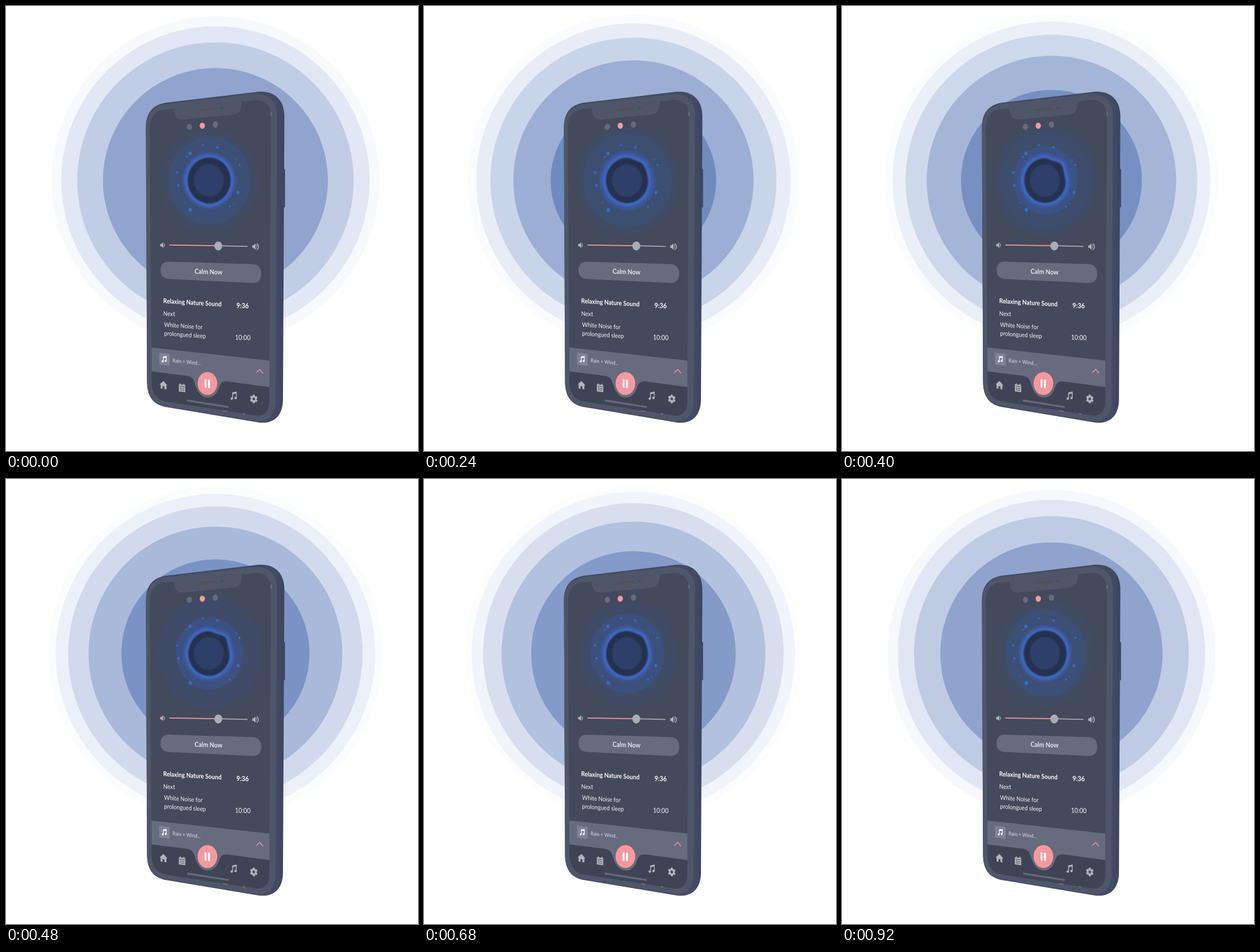
Animation of 720x778 px, one loop 0.96 s. Source, as an HTML page:

```html
<!DOCTYPE html>
<html lang="en">
<head>
<meta charset="utf-8">
<title>Calm player</title>
<style>
html, body { margin: 0; width: 100%; height: 100%; overflow: hidden; background: #fff; }
svg { display: block; width: 100vw; height: 100vh; }
text { font-family: Lato, "Open Sans", sans-serif; fill: #f4f5f7; }
.b { font-weight: 700; }
.icon { fill: #b0b4bc; }
.line { fill: none; stroke: #b0b4bc; stroke-linecap: round; }
</style>
</head>
<body>
<svg viewBox="0 0 720 778" xmlns="http://www.w3.org/2000/svg">
  <defs>
    <filter id="soft" x="-30%" y="-30%" width="160%" height="160%"><feGaussianBlur stdDeviation="2.6"/></filter>
    <filter id="fine" x="-30%" y="-30%" width="160%" height="160%"><feGaussianBlur stdDeviation="0.9"/></filter>
    <linearGradient id="side" x1="0" x2="1">
      <stop offset="0.94" stop-color="#434b64"/><stop offset="1" stop-color="#3b4561"/>
    </linearGradient>
    <g id="note">
      <path d="M-2.6 3.6V-5.2L4-6.6V2.4" fill="none" stroke="currentColor" stroke-width="1.5"/>
      <path d="M-2.6-4L4-5.4" stroke="currentColor" stroke-width="2"/>
      <ellipse cx="-4" cy="4.2" rx="2.1" ry="2" fill="currentColor"/>
      <ellipse cx="2.6" cy="3" rx="2.1" ry="2" fill="currentColor"/>
    </g>
    <clipPath id="screenClip">
      <path d="M251 213C252 194 260 183 276 181L434 164.500C453 163 463 174 463 194L460 692C460 709 451 718 435 715.500L283 692C264 689 255 679 254.500 658Z"/>
    </clipPath>
  </defs>

  <g id="waves"></g>

  <path d="M485.500 285H486.600Q487.600 285 487.600 287V350Q487.600 352 486.600 352H485.500Z" fill="#3a425b"/>
  <path d="M244.500 212C244.500 185 258 171 284 168.500L438 150.300C468 147 486 163 486.500 192L484 688C484 716 468 732 441 728L282 701.500C258 698 247 684 246.500 658Z" fill="url(#side)"/>
  <path d="M244.500 213C245 188 258 173.500 284 171L432 154C458 152 473 166 473.500 191L471 690C471 716 458 728 436 725.500L282 700C258 697 247 683 246.500 658Z" fill="#4f566a"/>

  <g clip-path="url(#screenClip)">
    <rect x="245" y="155" width="225" height="570" fill="#434a5b"/>
    <g id="pulse"></g>
    <g id="specks" fill="#3a69c1"></g>
    <path id="halo" fill="none" stroke="#3c62b8" stroke-width="9" filter="url(#soft)"/>
    <path id="rim" fill="#28334e" stroke="#4069c4" stroke-width="3.400" filter="url(#fine)"/>
    <ellipse cx="354.500" cy="305" rx="26" ry="28.500" fill="#2d416b" filter="url(#fine)"/>

    <path d="M253 597L461 620V668L384 690L330 690L253 640Z" fill="#666c7e"/>
    <path d="M253 638.500L316 646.500C326 648 328 653 331 663C335 677 343 684 352 684.500C361 685 368 679 372 668C375 659 378 655.500 388 656.500L462 666.500V722H253Z" fill="#3f4455"/>
    <path d="M285 163L293 180C294 193 299 199.500 309 198.500L397 190C407 189 412 182 412 167L412 160Z" fill="#4f566a"/>
  </g>
  <path d="M339.500 181.700L364.500 179.400" stroke="#53524f" stroke-width="3.600" stroke-linecap="round"/>
  <circle cx="377.300" cy="178" r="1.200" fill="#3d4054"/>
  <path d="M463 185V192M379 707.500L387 708.700M414 712.500L418 713.200" stroke="#8f95a5" stroke-width="0.900"/>

  <g fill="#656b7c">
    <ellipse cx="320.500" cy="211.300" rx="4.600" ry="5.400"/>
    <ellipse cx="343" cy="209.300" rx="4.600" ry="5.400" fill="#f69aa1"/>
    <ellipse cx="366" cy="207.300" rx="4.700" ry="5.500"/>
  </g>

  <path class="icon" d="M269.500 416H271.500L274.800 413.200V423L271.500 420.200H269.500Z"/>
  <path class="line" d="M276.500 416Q278 418.200 276.500 420.500" stroke-width="1.200"/>
  <path d="M285.500 417.800L371 419.200" stroke="#f2979f" stroke-width="1.700"/>
  <path d="M371 419.200L422 420.300" stroke="#a5aab3" stroke-width="1.700"/>
  <ellipse cx="371" cy="419.600" rx="6.900" ry="7.800" fill="#a9adb5"/>
  <path class="icon" d="M430.500 418.200H432.700L436 415.200V426L432.700 423H430.500Z"/>
  <path class="line" d="M437.800 418.200Q439.300 420.600 437.800 423M438.200 415.700C442.300 417.500 442.300 424 438.200 425.600" stroke-width="1.300"/>

  <path d="M284.500 446.900L431.500 451.200C441 451.700 446 458 446 468C446 478.500 440.500 484.800 431 484.200L284.500 477.200C275 476.700 270 471 270 461.800C270 452.500 275.500 446.600 284.500 446.900Z" fill="#666c7e"/>
  <g id="labels"></g>

  <path d="M267.700 606.300L286 608.500V629L267.700 626.700Z" fill="#7c8597"/>
  <use href="#note" transform="matrix(.78 .06 0 .85 277 618)" color="#fff"/>
  <path d="M437.500 641L443.300 635.200L449.300 642.300" fill="none" stroke="#f2979f" stroke-width="1.400"/>

  <ellipse cx="352" cy="660" rx="17.200" ry="20" fill="#f6989f"/>
  <path d="M347 652.500L350.400 652.900V667.500L347 667.100ZM353 653.200L356.400 653.600V668.200L353 667.800Z" fill="#fff"/>
  <path d="M317.500 689.800L388 701" stroke="#646a7b" stroke-width="3.200" stroke-linecap="round"/>

  <path class="icon" d="M275 655.500L282 663.200L280.300 663.300V670.200L276.800 669.700V665L273.500 664.600V669.200L270.200 668.700V662L268.500 661.500Z"/>
  <path class="icon" d="M302 661.300L304 661.500V659.800H305.500V661.700L310 662.200V660.500H311.500V662.400L313.300 662.600V675.200L302 673.700Z"/>
  <path d="M303 664.600L312.400 665.800" stroke="#3f4455" stroke-width="0.900"/>
  <path d="M304 668L311.500 669M304 671L311.500 672" stroke="#3f4455" stroke-width="1.300" stroke-dasharray="1.600 1.200"/>
  <use href="#note" transform="matrix(.98 .03 0 1.080 398.500 682)" color="#b0b4bc"/>
  <g transform="matrix(.92 .06 0 1.050 433 687)">
    <circle r="4" fill="none" stroke="#b0b4bc" stroke-width="3.400"/>
    <path id="teeth" stroke="#b0b4bc" stroke-width="3.600"/>
  </g>
</svg>
<script>
const NS = "http://www.w3.org/2000/svg";
const LOOP = 960, STEP = 40;
const $ = id => document.getElementById(id);

function add(parent, tag, attrs) {
  const el = document.createElementNS(NS, tag);
  for (const k in attrs) el.setAttribute(k, attrs[k]);
  $(parent).appendChild(el);
  return el;
}

// Screen text, foreshortened like the tilted phone
function label(str, x, y, size, slope, cls = "", fill = "#f4f5f7") {
  const el = add("labels", "text", {
    transform: `matrix(.88 ${slope} 0 1 ${x} ${y})`, "font-size": size, class: cls
  });
  el.style.fill = fill;
  el.textContent = str;
}
label("Calm Now", 329.5, 468, 12, .03, "b", "#e6e8ec");
label("Relaxing Nature Sound", 274.8, 519.3, 11.4, .053, "b", "#fff");
label("9:36", 402.8, 527.8, 12.2, .03, "b", "#fff");
label("Next", 274.8, 541.5, 11, .03);
label("White Noise for", 276.3, 560.7, 10.9, .06);
label("prolongued sleep", 276.3, 576, 11, .06);
label("10:00", 400.2, 583.2, 12, .03);
label("Rain + Wind...", 291, 622.8, 9.2, .09, "", "#dcdfe5");

const specks = [[321.5, 257.8, 3.2], [316, 263.5, 1.7], [344, 243.5, 1.9], [369.3, 247.3, 2.4],
  [402, 269, 1.3], [408, 277.8, 1.9], [299.2, 291, 2.3], [301.3, 313.7, 2.3], [322.2, 356.4, 3.2],
  [311.8, 344, 1.2], [405.3, 326.3, 2.8], [391.3, 350.6, 1.8], [398, 345.7, 1.1]];
for (const [cx, cy, r] of specks) add("specks", "ellipse", { cx, cy, rx: r * .95, ry: r * 1.05 });

let teeth = "";
for (let i = 0; i < 6; i++) {
  const a = i * Math.PI / 3 + Math.PI / 6, c = Math.cos(a), s = Math.sin(a);
  teeth += `M${4.5 * c} ${4.5 * s}L${7.2 * c} ${7.2 * s}`;
}
$("teeth").setAttribute("d", teeth);

// Colour stops: [age in loops, red, green, blue]
const waveStops = [[0, 100, 130, 185], [1, 145, 164, 206], [2, 192, 205, 228],
  [3, 225, 231, 244], [4, 247, 249, 253], [5, 255, 255, 255]];
const pulseStops = [[0, 58, 85, 144], [.333, 59, 82, 134], [1, 60, 79, 116], [1.333, 61, 79, 112],
  [1.5, 64, 75, 104], [2, 65, 75, 97], [2.5, 64, 75, 103], [2.75, 67, 74, 91]];

function shade(stops, s) {
  let i = 1;
  while (i < stops.length - 1 && s > stops[i][0]) i++;
  const a = stops[i - 1], b = stops[i];
  const u = Math.min(1, (s - a[0]) / (b[0] - a[0]));
  return `rgb(${[1, 2, 3].map(k => Math.round(a[k] + (b[k] - a[k]) * u))})`;
}

const waveRadius = s => 315 - 191 * .62 ** s - 4 * Math.exp(-6 * s);
const pulseRadius = s => 99.4 - 60.5 * .45 ** s;

// Oldest and widest first
const waves = [4, 3, 2, 1, 0].map(age => ({ age, el: add("waves", "circle", { cx: 366, cy: 305 }) }));
const pulses = [2, 1, 0].map(age => ({ age, el: add("pulse", "ellipse", { cx: 355.7, cy: 305 }) }));

const bell = (x, mid, w) => Math.exp(-(((x - mid) / w) ** 2));

function blob(amount, grow) {
  let d = "";
  for (let i = 0; i < 90; i++) {
    const a = i / 90 * 2 * Math.PI - Math.PI;
    const k = grow + amount * (2.4 * bell(a, -.76, .24) - 2.2 * bell(a, -1.2, .25) - 1.6 * bell(a, -.25, .35));
    d += (i ? "L" : "M") + (355 + (38.3 + k) * Math.cos(a)).toFixed(2) + " " +
      (305 + (41 + k) * Math.sin(a)).toFixed(2);
  }
  return d + "Z";
}

function draw(ms) {
  const p = Math.floor((ms % LOOP) / STEP) * STEP / LOOP;
  for (const { age, el } of waves) {
    el.setAttribute("r", waveRadius(age + p));
    el.setAttribute("fill", shade(waveStops, age + p));
  }
  for (const { age, el } of pulses) {
    const r = pulseRadius(age + p);
    el.setAttribute("rx", r);
    el.setAttribute("ry", r * 1.066);
    el.setAttribute("fill", shade(pulseStops, age + p));
  }
  const bump = Math.max(0, Math.cos((p - .48) * Math.PI / .66));
  const grow = 1.2 * (1 + Math.cos(2 * Math.PI * p)) / 2;
  $("halo").setAttribute("d", blob(bump, grow + .8));
  $("rim").setAttribute("d", blob(bump, grow));
}

let start;
function tick(now) {
  if (start === undefined) start = now;
  draw(Math.max(0, now - start));
  requestAnimationFrame(tick);
}
draw(0);
requestAnimationFrame(tick);
</script>
</body>
</html>
```
